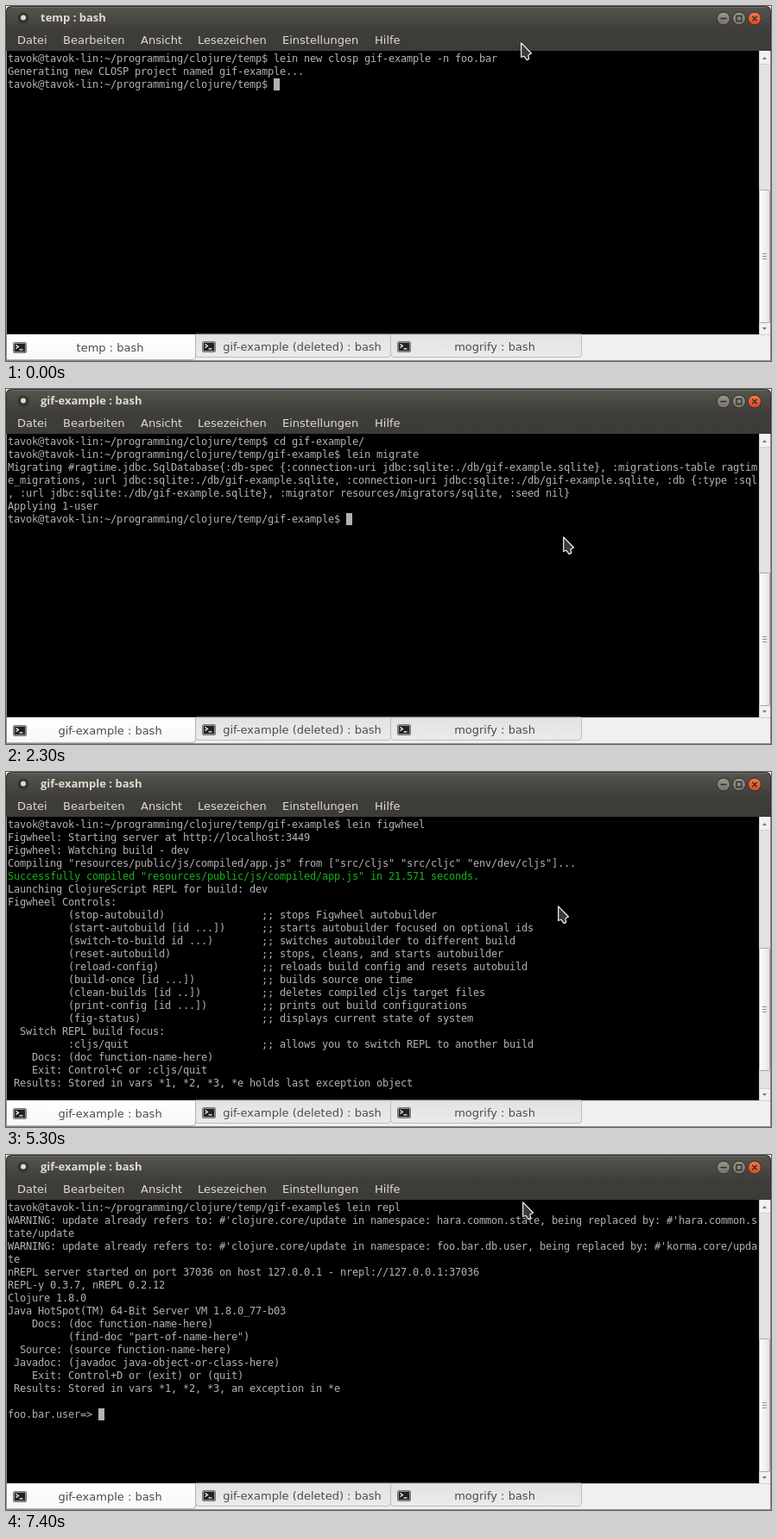
Animation of 886x412 px, one loop 8 s. Source, as an HTML page:

```html
<!DOCTYPE html>
<html lang="de">
<head>
<meta charset="utf-8">
<title>Terminal</title>
<style>
html, body { margin: 0; width: 100%; height: 100%; overflow: hidden; background: #fff; }
svg { display: block; width: 886px; height: 412px; }
text { white-space: pre; }
.term { font: 12px "DejaVu Sans Mono", monospace; fill: #b2b2b2; }
.ui { font: 13px "DejaVu Sans", sans-serif; }
.menu { fill: #dfdbd2; }
.tab { fill: #4c4c4c; text-anchor: middle; }
.title { font: bold 13px "Open Sans", sans-serif; fill: #dfdbd2; }
</style>
</head>
<body>
<svg id="stage" viewBox="0 0 886 412">
  <defs>
    <linearGradient id="bar" x2="0" y2="1">
      <stop offset="0" stop-color="#56544d"/><stop offset=".55" stop-color="#3e3d39"/><stop offset="1" stop-color="#3c3b37"/>
    </linearGradient>
    <linearGradient id="thumbFill">
      <stop offset="0" stop-color="#fdfdfd"/><stop offset="1" stop-color="#e4e4e4"/>
    </linearGradient>
    <linearGradient id="tabOn" x2="0" y2="1">
      <stop offset="0" stop-color="#fff"/><stop offset="1" stop-color="#f7f7f7"/>
    </linearGradient>
    <linearGradient id="tabOff" x2="0" y2="1">
      <stop offset="0" stop-color="#e2e2e2"/><stop offset="1" stop-color="#ebebeb"/>
    </linearGradient>
    <linearGradient id="knob" x2="0" y2="1">
      <stop offset="0" stop-color="#99978c"/><stop offset="1" stop-color="#74726a"/>
    </linearGradient>
    <linearGradient id="closeKnob" x2="0" y2="1">
      <stop offset="0" stop-color="#f37a51"/><stop offset="1" stop-color="#d9481e"/>
    </linearGradient>
    <g id="shell">
      <rect x=".5" y=".5" width="15" height="12" rx="1.5" fill="#222" stroke="#777"/>
      <rect x="1.5" y="1.5" width="13" height="10" fill="none" stroke="#ddd" stroke-width=".6"/>
      <path d="M3.5 3.5l3 2-3 2M7.5 8.8h4" fill="none" stroke="#fff" stroke-width="1.2"/>
    </g>
  </defs>

  <path d="M0 412V6Q0 0 6 0H880Q886 0 886 6V412Z" fill="#32312d"/>
  <path d="M1 52V7Q1 1 7 1H879Q885 1 885 7V52Z" fill="url(#bar)"/>
  <path d="M6 1.5H880" stroke="#706e66"/>
  <circle cx="20" cy="14" r="6.5" fill="#35342f"/>
  <circle cx="20" cy="13.5" r="3" fill="#dedad2"/>
  <text id="title" class="title" x="40" y="18"></text>

  <g stroke="#2d2c28">
    <circle cx="831" cy="14.5" r="7.5" fill="url(#knob)"/>
    <circle cx="849" cy="14.5" r="7.5" fill="url(#knob)"/>
    <circle cx="867" cy="14.5" r="7.5" fill="url(#closeKnob)"/>
    <path d="M827.5 14.5h7M846 11.5h6v6h-6zM864.3 11.8l5.4 5.4m0-5.4l-5.4 5.4" fill="none" stroke-width="1.3"/>
  </g>
  <g id="menu" class="ui menu"></g>

  <rect y="52" width="886" height="360" fill="#8c8c8c"/>
  <rect x="1" y="52" width="871" height="329" fill="#000"/>
  <rect x="872" y="52" width="13" height="329" fill="#e3e3e3"/>
  <path d="M872.5 52V381" stroke="#c6c6c6"/>
  <rect x="873" y="52" width="12" height="15" fill="#f1f1f1"/>
  <rect x="873" y="367" width="12" height="14" fill="#f1f1f1"/>
  <path d="M873 67.5h12M873 367.5h12" stroke="#cfcfcf"/>
  <path d="M876 62l2.5-3 2.5 3zM876 373l2.5 3 2.5-3z" fill="#777"/>
  <rect id="thumb" x="872.5" width="12" rx="1" fill="url(#thumbFill)" stroke="#a8a8a8"/>
  <path id="grip" d="M876 -2.5h5M876 .5h5M876 3.5h5" stroke="#8f8f8f"/>

  <rect x="1" y="381" width="884" height="30" fill="#f0f0f0"/>
  <path d="M219.5 381V404Q219.5 407.5 223 407.5H442Q445.5 407.5 445.5 404V381Z" fill="url(#tabOff)" stroke="#bdbdbd"/>
  <path d="M445.5 381V404Q445.5 407.5 449 407.5H663Q666.5 407.5 666.5 404V381Z" fill="url(#tabOff)" stroke="#bdbdbd"/>
  <path d="M1 381V410.5H216Q219.5 410.5 219.5 407V381Z" fill="url(#tabOn)"/>
  <path d="M1 410.5H216Q219.5 410.5 219.5 407V381" fill="none" stroke="#b2b2b2"/>
  <path d="M220 381.5H885" stroke="#d0d0d0"/>
  <use href="#shell" x="8" y="390"/>
  <use href="#shell" x="227" y="389"/>
  <use href="#shell" x="453" y="389"/>
  <g class="ui tab">
    <text id="tab" x="120.5" y="401"></text>
    <text x="343" y="400">gif-example (deleted) : bash</text>
    <text x="566" y="400">mogrify : bash</text>
  </g>

  <g id="screen" class="term"></g>
  <rect id="caret" width="7" height="14" fill="#b2b2b2"/>
  <path id="pointer" d="M.7 .8V17.5L4 16.3L7.2 20.6L9.7 19.4L8.9 15L12.5 13Z" fill="#3b3b3b" stroke="#f4f4f4" stroke-width="1.2" stroke-linejoin="round"/>
</svg>
<script>
const NS = "http://www.w3.org/2000/svg";
const CELL = 7, ROW = 15, LEFT = 2, BASE = 65, LOOP = 8000;
const $ = id => document.getElementById(id);

function addText(parent, x, y, str) {
  const el = document.createElementNS(NS, "text");
  el.setAttribute("x", x);
  el.setAttribute("y", y);
  el.textContent = str;
  parent.append(el);
  return el;
}

function place(id, x, y) {
  $(id).setAttribute("transform", `translate(${x} ${y})`);
}

const home = "tavok@tavok-lin:~/programming/clojure/temp";
const project = home + "/gif-example$ ";
const help = (cmd, note) => (" ".repeat(10) + cmd).padEnd(42) + ";; " + note;

const scenes = [
  {
    start: 0, title: "temp : bash", thumb: [213, 367], pointer: [596, 42], caret: true,
    lines: [
      home + "$ lein new closp gif-example -n foo.bar",
      "Generating new CLOSP project named gif-example...",
      home + "$ "
    ]
  },
  {
    start: 500, title: "gif-example : bash", thumb: [213, 367], pointer: [645, 171], caret: true,
    lines: [
      home + "$ cd gif-example/",
      project + "lein migrate",
      "Migrating #ragtime.jdbc.SqlDatabase{:db-spec {:connection-uri jdbc:sqlite:./db/gif-example.sqlite}, :migrations-table ragtim",
      "e_migrations, :url jdbc:sqlite:./db/gif-example.sqlite, :connection-uri jdbc:sqlite:./db/gif-example.sqlite, :db {:type :sql",
      ", :url jdbc:sqlite:./db/gif-example.sqlite}, :migrator resources/migrators/sqlite, :seed nil}",
      "Applying 1-user",
      project
    ]
  },
  {
    start: 3500, title: "gif-example : bash", thumb: [204, 346], pointer: [639, 155], green: 4,
    lines: [
      project + "lein figwheel",
      "Figwheel: Starting server at http://localhost:3449",
      "Figwheel: Watching build - dev",
      'Compiling "resources/public/js/compiled/app.js" from ["src/cljs" "src/cljc" "env/dev/cljs"]...',
      'Successfully compiled "resources/public/js/compiled/app.js" in 21.571 seconds.',
      "Launching ClojureScript REPL for build: dev",
      "Figwheel Controls:",
      help("(stop-autobuild)", "stops Figwheel autobuilder"),
      help("(start-autobuild [id ...])", "starts autobuilder focused on optional ids"),
      help("(switch-to-build id ...)", "switches autobuilder to different build"),
      help("(reset-autobuild)", "stops, cleans, and starts autobuilder"),
      help("(reload-config)", "reloads build config and resets autobuild"),
      help("(build-once [id ...])", "builds source one time"),
      help("(clean-builds [id ..])", "deletes compiled cljs target files"),
      help("(print-config [id ...])", "prints out build configurations"),
      help("(fig-status)", "displays current state of system"),
      "  Switch REPL build focus:",
      help(":cljs/quit", "allows you to switch REPL to another build"),
      "    Docs: (doc function-name-here)",
      "    Exit: Control+C or :cljs/quit",
      " Results: Stored in vars *1, *2, *3, *e holds last exception object"
    ]
  },
  {
    start: 6500, title: "gif-example : bash", thumb: [213, 367], pointer: [598, 54], caret: true,
    lines: [
      project + "lein repl",
      "WARNING: update already refers to: #'clojure.core/update in namespace: hara.common.state, being replaced by: #'hara.common.s",
      "tate/update",
      "WARNING: update already refers to: #'clojure.core/update in namespace: foo.bar.db.user, being replaced by: #'korma.core/upda",
      "te",
      "nREPL server started on port 37036 on host 127.0.0.1 - nrepl://127.0.0.1:37036",
      "REPL-y 0.3.7, nREPL 0.2.12",
      "Clojure 1.8.0",
      "Java HotSpot(TM) 64-Bit Server VM 1.8.0_77-b03",
      "    Docs: (doc function-name-here)",
      '          (find-doc "part-of-name-here")',
      "  Source: (source function-name-here)",
      " Javadoc: (javadoc java-object-or-class-here)",
      "    Exit: Control+D or (exit) or (quit)",
      " Results: Stored in vars *1, *2, *3, an exception in *e",
      "",
      "foo.bar.user=> "
    ]
  }
];

const menu = { Datei: 13, Bearbeiten: 66, Ansicht: 156, Lesezeichen: 222, Einstellungen: 320, Hilfe: 427 };
for (const [name, x] of Object.entries(menu)) addText($("menu"), x, 44, name);

// Snap the monospaced glyphs to whole-pixel terminal cells.
const probe = addText($("screen"), 0, 0, "m".repeat(100));
$("screen").style.letterSpacing = CELL - probe.getComputedTextLength() / 100 + "px";

function show(scene) {
  const { lines, thumb: [top, bottom] } = scene;
  $("title").textContent = $("tab").textContent = scene.title;
  $("screen").replaceChildren();
  lines.forEach((line, i) => {
    const el = addText($("screen"), LEFT, BASE + i * ROW, line);
    if (i === scene.green) el.setAttribute("fill", "#18b218"), el.style.fill = "#18b218";
  });
  const last = lines.length - 1;
  $("caret").style.display = scene.caret ? "" : "none";
  place("caret", LEFT + lines[last].length * CELL, BASE - 11 + last * ROW);
  place("pointer", ...scene.pointer);
  $("thumb").setAttribute("y", top + 0.5);
  $("thumb").setAttribute("height", bottom - top);
  place("grip", 0, Math.round((top + bottom) / 2));
}

let current;
function tick() {
  const t = performance.now() % LOOP;
  const scene = scenes.findLast(s => s.start <= t);
  if (scene !== current) show(current = scene);
  requestAnimationFrame(tick);
}
tick();
</script>
</body>
</html>
```
